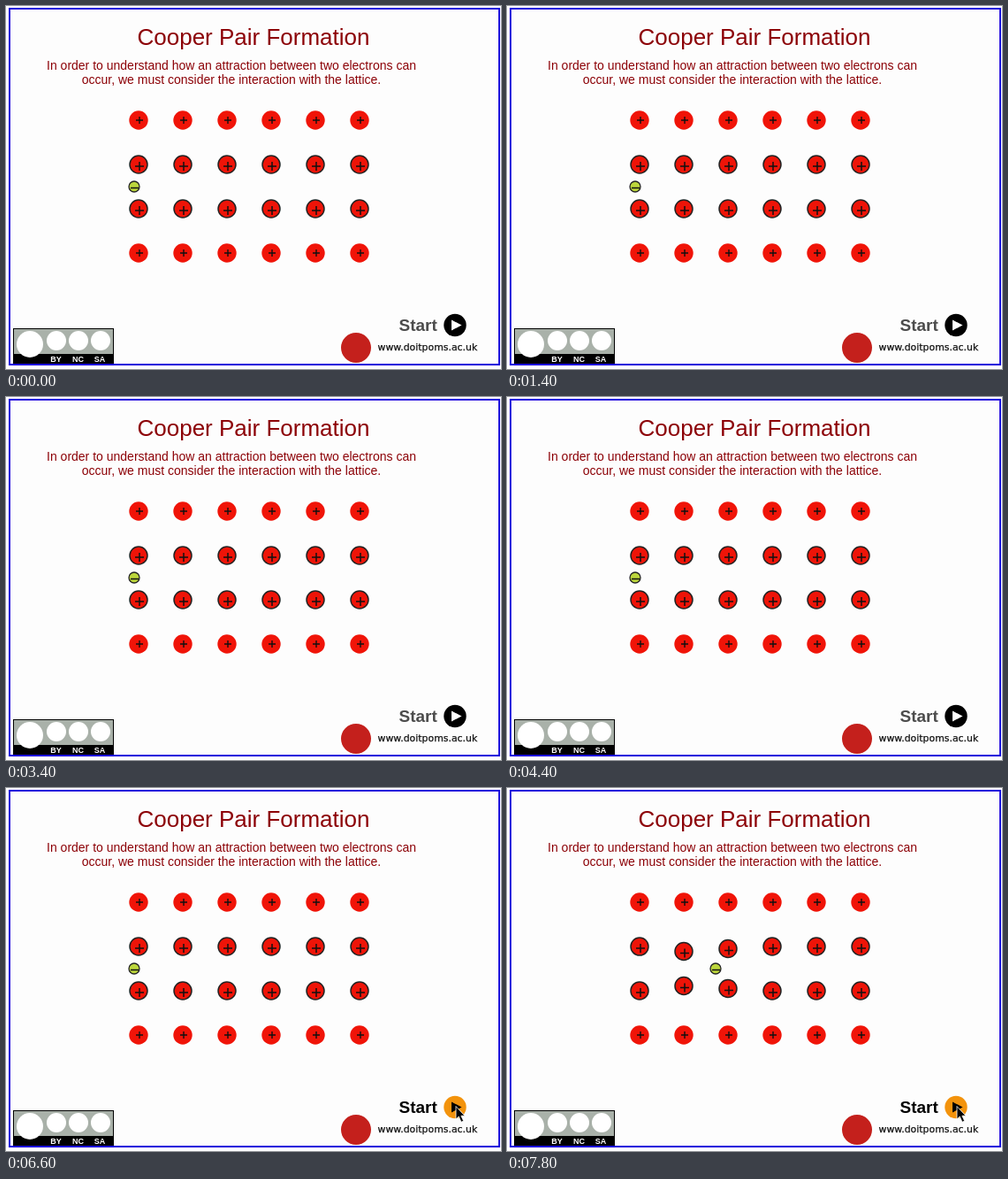
Animation of 560 by 410 pixels, one loop 8 s. Source, as an HTML page:

```html
<!DOCTYPE html>
<html lang="en">
<head>
<meta charset="utf-8">
<title>Cooper Pair Formation</title>
<style>
  html, body { margin: 0; width: 100%; height: 100%; overflow: hidden; background: #fff; }
  svg { display: block; width: 560px; height: 410px; }
  text { font-family: "Liberation Sans", Arial, sans-serif; }
  .heading { fill: #8c0006; text-anchor: middle; }
  .badge { font-size: 9px; font-weight: bold; fill: #fff; text-anchor: middle; }
</style>
</head>
<body>
<svg viewBox="0 0 560 410">
  <rect x="4" y="3" width="554" height="402" fill="#fdfdfd" stroke="#1c00dc" stroke-width="2"/>
  <text class="heading" x="280" y="44" font-size="26">Cooper Pair Formation</text>
  <g class="heading" font-size="14">
    <text x="255" y="72">In order to understand how an attraction between two electrons can</text>
    <text x="255" y="88">occur, we must consider the interaction with the lattice.</text>
  </g>

  <g id="lattice"></g>
  <g id="electron">
    <circle r="6" fill="#bcd63c" stroke="#222" stroke-width="1.3"/>
    <path d="M-4 1.5H5" stroke="#111" stroke-width="1.5"/>
  </g>

  <rect x="8.5" y="364.5" width="113" height="39" fill="#a9b1a9" stroke="#000"/>
  <rect x="8" y="393" width="114" height="11"/>
  <g fill="#fff">
    <circle cx="27" cy="382" r="15"/>
    <circle cx="57" cy="378" r="11"/>
    <circle cx="82" cy="378" r="11"/>
    <circle cx="107" cy="378" r="11"/>
  </g>
  <g class="badge">
    <text x="56.5" y="402">BY</text>
    <text x="81.5" y="402">NC</text>
    <text x="106" y="402">SA</text>
  </g>

  <circle cx="396" cy="386" r="17" fill="#c4201c"/>
  <text x="420.5" y="389" fill="#111" stroke="#111" stroke-width=".25"
        style="font: 10.9px 'DejaVu Sans', Verdana, sans-serif">www.doitpoms.ac.uk</text>

  <text id="label" x="444.5" y="366.5" font-size="19" font-weight="bold">Start</text>
  <circle id="button" cx="508" cy="360.5" r="12.7"/>
  <path id="arrow" d="M504 354.5L515.5 360.5L504 366.5Z"/>
  <path id="cursor" d="M509 359.5V374L512.2 371L515 377.3L517.6 376.1L514.9 370.2H519Z"
        stroke="#fff" stroke-width=".8"/>
</svg>
<script>
const LOOP = 8000, STEP = 200, HOVER = 4800, LAUNCH = 6800;
const START_X = 145, SPEED = 0.091;
const $ = id => document.getElementById(id);
const ions = [];

function addIon(col, row) {
  const inner = row === 1 || row === 2;
  const g = document.createElementNS("http://www.w3.org/2000/svg", "g");
  g.innerHTML = inner
    ? `<circle r="10" fill="#ee1408" stroke="#222" stroke-width="1.5"/>
       <path d="M-4 2H6M1 -3V7" stroke="#111" stroke-width="1.5"/>`
    : `<circle r="10.7" fill="#f01408"/>
       <path d="M-3 0H5M1 -4V4" stroke="#111" stroke-width="1.4"/>`;
  $("lattice").append(g);
  ions.push({ g, x: 150 + col * 50, y: 129 + row * 50, pull: inner ? (row === 1 ? 1 : -1) : 0 });
}
for (let row = 0; row < 4; row++)
  for (let col = 0; col < 6; col++) addIon(col, row);

const place = (el, x, y) => el.setAttribute("transform", `translate(${x} ${y})`);

// Ions lean towards the electron, most strongly just after it passes.
function attraction(electronX, ionX) {
  const lag = (electronX - ionX - 18) / 29.8;
  const onset = Math.min(1, (electronX - START_X) / 20);
  return 7.9 * onset * Math.exp(-lag * lag);
}

function draw(time) {
  const t = Math.floor(time % LOOP / STEP) * STEP;
  const x = START_X + Math.max(0, t - LAUNCH) * SPEED;
  place($("electron"), x, 204);
  for (const ion of ions) place(ion.g, ion.x, ion.y + ion.pull * attraction(x, ion.x));

  const hover = t >= HOVER;
  $("label").setAttribute("fill", hover ? "#000" : "#4c4c4c");
  $("button").setAttribute("fill", hover ? "#f3930c" : "#000");
  $("arrow").setAttribute("fill", hover ? "#000" : "#fff");
  $("cursor").setAttribute("visibility", hover ? "visible" : "hidden");
}

const begin = performance.now();
function tick() {
  draw(performance.now() - begin);
  requestAnimationFrame(tick);
}
tick();
</script>
</body>
</html>
```
